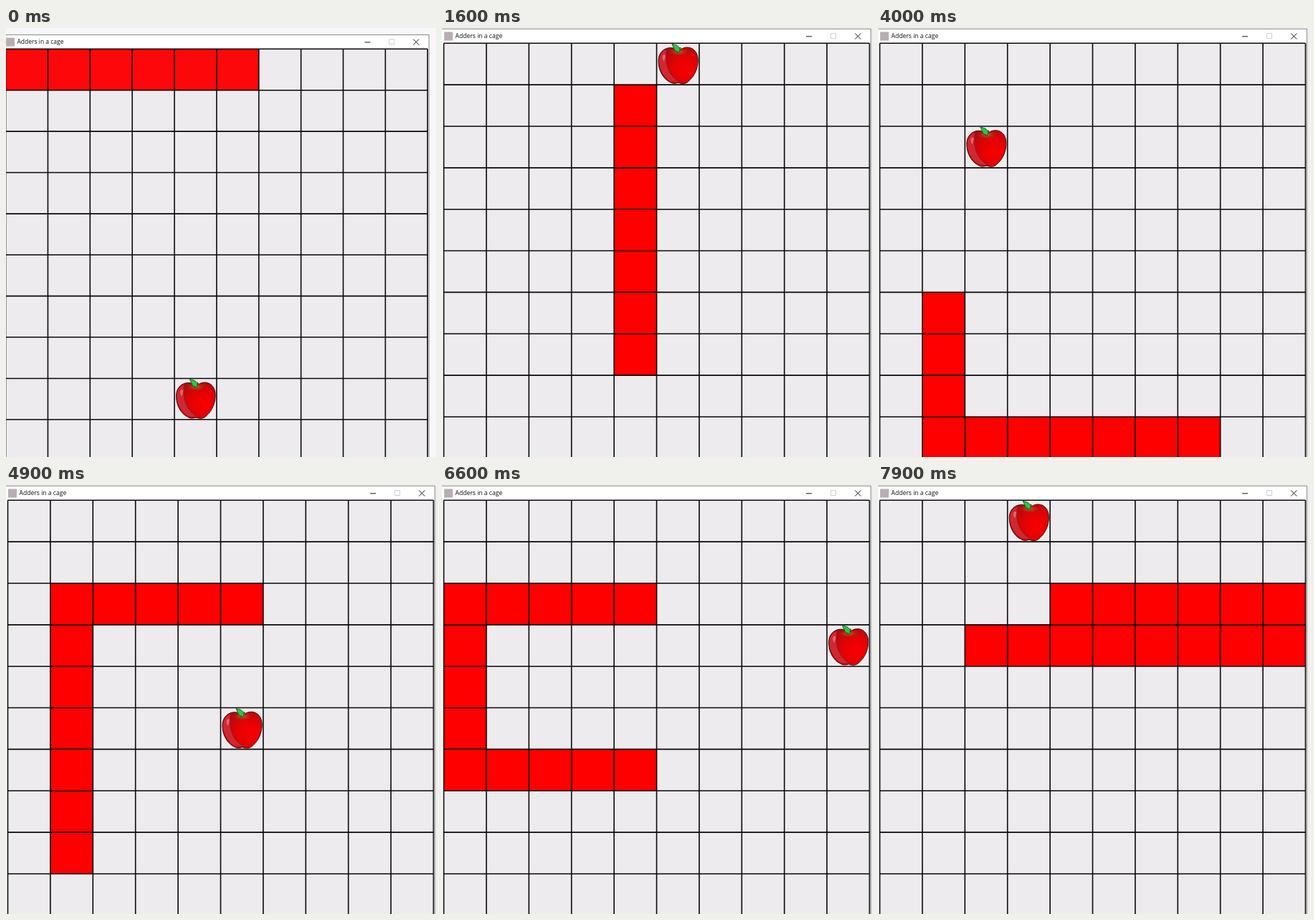
An HTML page for the animation above (8000 ms loop, 600 by 598 pixels).

```html
<!DOCTYPE html>
<html lang="en">
<head>
<meta charset="utf-8">
<title>Adders in a cage</title>
<style>
  html, body { margin: 0; width: 100%; height: 100%; overflow: hidden; background: #f8f6f8; }
  svg { display: block; width: 100vw; height: 100vh; }
  text { font: 8.6px "Open Sans", "Noto Sans", sans-serif; fill: #111; }
</style>
</head>
<body>
<svg viewBox="0 0 600 598" preserveAspectRatio="none">
  <defs>
    <radialGradient id="skin" cx="0.7" cy="0.6" r="0.68">
      <stop offset="0" stop-color="#fa0000"/>
      <stop offset="0.5" stop-color="#e30204"/>
      <stop offset="1" stop-color="#ad0b10"/>
    </radialGradient>
    <radialGradient id="hollow" cx="0.5" cy="0.5" r="0.5">
      <stop offset="0" stop-color="#a5752c"/>
      <stop offset="1" stop-color="#b02010" stop-opacity="0"/>
    </radialGradient>
  </defs>
  <g id="window">
    <rect x="-4" y="1.3" width="602.5" height="640" fill="#fff" stroke="#8c8a8d"/>
    <rect x="3" y="5.5" width="12" height="12" fill="#b8aeb2"/>
    <text x="18.5" y="14.4">Adders in a cage</text>
    <g fill="none" stroke="#111">
      <path d="M508 11.8h8"/>
      <path d="M542.5 7.5h7v7h-7z" stroke="#cfcdd0"/>
      <path d="M576.3 7.5l8 8m0-8l-8 8"/>
    </g>
    <rect x="2.5" y="21.3" width="594" height="600" fill="#edebee"/>
    <path id="snake"/>
    <path id="grid" fill="none" stroke="#080808" stroke-width="1.6"/>
    <g id="apple">
      <path d="M28 9C22 3 3 6 3 25C3 38 10 50 19 54C23 57 27 56 31 55C36 57 42 57 46 52C54 45 59 33 58 21C57 8 45 2 35 8C33 9 30 10 28 9Z" fill="url(#skin)" stroke="#3a0608"/>
      <path d="M14 9C6 12 3 20 4 28C5 38 12 49 20 53C26 54 29 54 31 53C20 45 14 34 14 20Z" fill="#cf2830"/>
      <path d="M14 12C12 30 18 44 31 53" fill="none" stroke="#a4141a" stroke-width="1.2"/>
      <path d="M9 17C11 15 13 15 13 18L11 25C9 24 8 20 9 17Z" fill="#e2656b"/>
      <ellipse cx="31" cy="12" rx="15" ry="6" fill="url(#hollow)"/>
      <path d="M29 13Q30 9 34 6" fill="none" stroke="#3f4a12" stroke-width="2"/>
      <path d="M22 1L29 3L33 7L32 13L26 10Z" fill="#2fc544" stroke="#12632a"/>
    </g>
  </g>
</svg>
<script>
const LOOP = 8000, TICK = 100, START_LENGTH = 6, STALL = 49, ZOOM_TICKS = 3;
const LEFT = 2.5, TOP = 21.3, CELL_W = 59.4, CELL_H = 57.85;

const corners = [[0, 0], [5, 0], [5, 8], [4, 8], [4, 0], [8, 0], [8, 9], [1, 9],
  [1, 2], [5, 2], [5, 6], [0, 6], [0, 2], [9, 2], [9, 3], [2, 3]];
const apples = [[4, 8], [5, 0], [8, 5], [3, 9], [2, 2], [5, 5], [1, 6], [9, 3], [3, 0]];

const $ = id => document.getElementById(id);
const px = col => LEFT + col * CELL_W;
const py = row => TOP + row * CELL_H;

// Every cell the head visits, one per tick.
const route = [corners[0]];
for (const [col, row] of corners.slice(1)) {
  let [x, y] = route[route.length - 1];
  while (x !== col || y !== row) {
    x += Math.sign(col - x);
    y += Math.sign(row - y);
    route.push([x, y]);
  }
}

// Route index at which each apple is eaten, in order.
let reached = START_LENGTH - 1;
const meals = apples.map(([col, row]) => {
  const at = route.findIndex(([x, y], i) => i > reached && x === col && y === row);
  return reached = at < 0 ? Infinity : at;
});

let lines = "";
for (let i = 0; i <= 10; i++) {
  lines += `M${px(i)} ${TOP}V620M${LEFT} ${py(i)}H${px(10)}`;
}
$("grid").setAttribute("d", lines);

function draw(time) {
  const tick = Math.floor(time % LOOP / TICK);
  const head = START_LENGTH - 1 + tick - (tick >= STALL ? 1 : 0);
  const eaten = meals.filter(at => at <= head).length;
  const body = route.slice(head - START_LENGTH - eaten + 1, head + 1);

  $("snake").setAttribute("d", body.map(([col, row]) =>
    `M${px(col)} ${py(row)}h${CELL_W}v${CELL_H}h${-CELL_W}z`).join(""));
  $("snake").setAttribute("fill", tick < ZOOM_TICKS ? "#fc080a" : "#f00");

  const [col, row] = apples[eaten];
  $("apple").setAttribute("transform", `translate(${px(col) - 0.5} ${py(row)})`);

  const away = Math.max(0, 1 - tick / ZOOM_TICKS) ** 2;
  $("window").setAttribute("transform",
    `translate(${-2.9 * away} ${8.2 * away}) scale(${1 - 0.009 * away} ${1 - 0.008 * away})`);
}

function loop() {
  draw(performance.now());
  requestAnimationFrame(loop);
}
loop();
</script>
</body>
</html>
```
